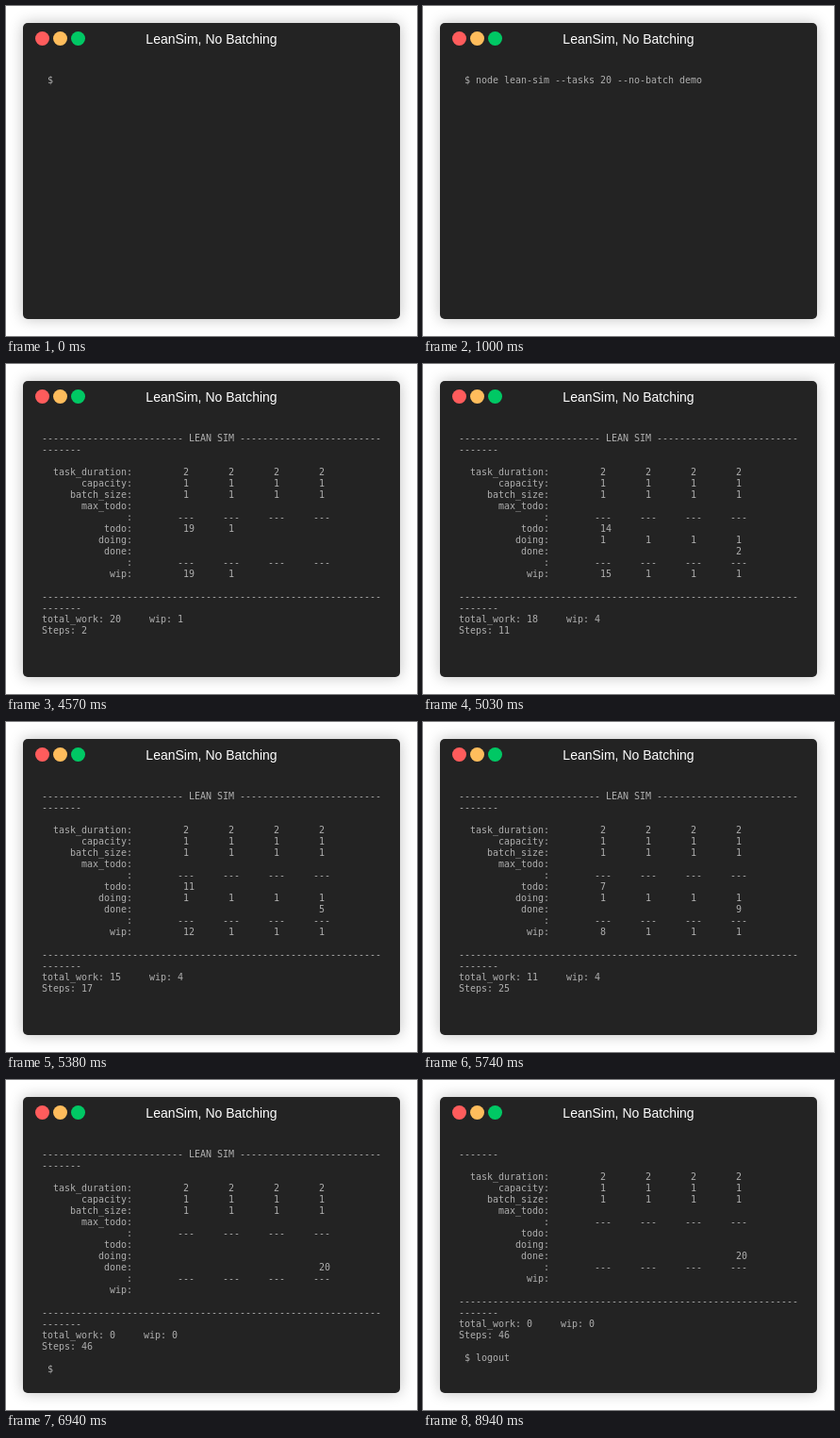
Recreate the animation shown at these times as an HTML page with a canvas. Size 436 px wide and 350 px high, loop 9700 ms.

```html
<!DOCTYPE html>
<html lang="en">
<head>
<meta charset="utf-8">
<title>LeanSim, No Batching</title>
<style>
  html, body { margin: 0; width: 100%; height: 100%; overflow: hidden; background: #fff; }
  canvas { display: block; }
</style>
</head>
<body>
<canvas id="stage" width="436" height="350"></canvas>
<script>
const ctx = document.getElementById('stage').getContext('2d');
const LOOP = 9700, TASKS = 20, STATIONS = [0, 1, 2, 3];
const COMMAND = 'node lean-sim --tasks 20 --no-batch demo';

// [time, simulation step reached]
const PACE = [[4520, 1], [5030, 11], [5740, 25], [6210, 34], [6530, 40], [6840, 46]];

function stepAt(t) {
  if (t < PACE[0][0]) return 0;
  for (let i = 1; i < PACE.length; i++) {
    const [t0, s0] = PACE[i - 1], [t1, s1] = PACE[i];
    if (t < t1) return Math.floor(s0 + (s1 - s0) * (t - t0) / (t1 - t0));
  }
  return 46;
}

const clampTasks = n => Math.max(0, Math.min(TASKS, n));
const row = (label, values = []) => (label + ':').padStart(16) + ' '.repeat(8) +
  values.map(v => (typeof v === 'string' ? v : ' ' + (v || '')).padEnd(8)).join('');
const wrap = line => line.match(/.{1,60}/g);

// Every task takes two steps per station: picked up on odd steps, passed on at even ones.
function report(step) {
  const odd = step % 2, cycle = (step - odd) / 2;
  const finished = j => j < 0 ? TASKS : clampTasks(cycle - j);
  const wip = STATIONS.map(j => finished(j - 1) - finished(j));
  const doing = wip.map(n => n && odd);
  const todo = wip.map((n, j) => n - doing[j]);
  const done = finished(3), started = clampTasks(cycle + odd);
  const all = v => STATIONS.map(() => v);
  return [
    ...wrap('-'.repeat(25) + ' LEAN SIM ' + '-'.repeat(32)),
    '',
    row('task_duration', all(2)),
    row('capacity', all(1)),
    row('batch_size', all(1)),
    row('max_todo'),
    row('', all('---')),
    row('todo', todo),
    row('doing', doing),
    row('done', [0, 0, 0, done]),
    row('', all('---')),
    row('wip', wip),
    '',
    ...wrap('-'.repeat(67)),
    `total_work: ${TASKS - done}     wip: ${started - done}`,
    step ? `Steps: ${step}` : ''
  ];
}

function screenAt(t) {
  if (t < 500) return [' $'];
  if (t < 1000) return [' $ ' + COMMAND.slice(0, 38)];
  if (t < 3020) return [' $ ' + COMMAND];
  const lines = report(stepAt(t));
  if (t >= 8940) return [...lines.slice(1), '', ' $ logout'];
  return t >= 6940 ? [...lines, '', ' $'] : lines;
}

function drawWindow() {
  ctx.fillStyle = '#fff';
  ctx.fillRect(0, 0, 436, 350);
  ctx.save();
  ctx.shadowColor = 'rgba(0, 0, 0, 0.25)';
  ctx.shadowBlur = 15;
  ctx.fillStyle = '#232323';
  ctx.beginPath();
  ctx.roundRect(18, 18, 400, 314, 5);
  ctx.fill();
  ctx.restore();
  ['#ff5c5c', '#ffbd5c', '#00c864'].forEach((color, i) => {
    ctx.fillStyle = color;
    ctx.beginPath();
    ctx.arc(38.5 + 19 * i, 34.5, 7.5, 0, 2 * Math.PI);
    ctx.fill();
  });
  ctx.fillStyle = '#fff';
  ctx.font = '14px "Liberation Sans", Arial, sans-serif';
  ctx.textAlign = 'center';
  ctx.fillText('LeanSim, No Batching', 218, 40);
}

function drawText(lines) {
  ctx.fillStyle = '#afafaf';
  ctx.font = '10px "DejaVu Sans Mono", monospace';
  ctx.textAlign = 'left';
  lines.forEach((line, y) => [...line].forEach((char, x) => {
    if (char !== ' ') ctx.fillText(char, 38 + 6 * x, 82 + 12 * y);
  }));
}

const start = performance.now();
function frame() {
  drawWindow();
  drawText(screenAt((performance.now() - start) % LOOP));
  requestAnimationFrame(frame);
}
frame();
</script>
</body>
</html>
```
